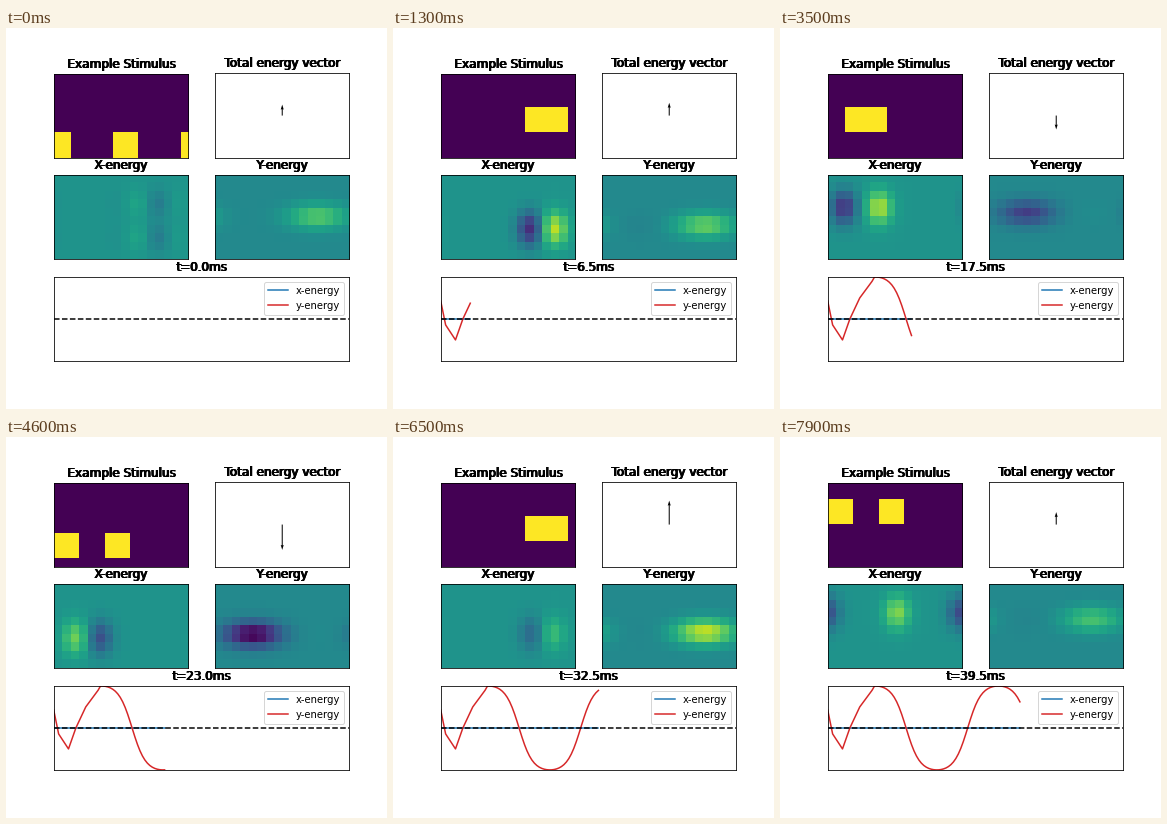
A matplotlib script for the animation above (8 s loop, 381 by 381 pixels).

```python
import numpy as np
import matplotlib.pyplot as plt
from matplotlib.animation import FuncAnimation

DPI, FRAMES, PERIOD = 72, 80, 50
COLS, ROWS = 16, 10
HALF_W, HALF_H = 67.2, 42.4
LAG = 4.5
SCALE = 5.3 * DPI / 381  # layout is a fraction of a pixel larger than the stage

row, col = np.mgrid[:ROWS, :COLS]
steps = np.arange(FRAMES)


def phase(i):
    return 2 * np.pi * i / PERIOD


def y_curve(i):
    """Start-up dip, then a slightly squared cosine."""
    start = np.interp(i, [0, 2, 6, 9, 13, 19], [18, -6, -21, 0, 21, 41])
    steady = 42 * np.tanh(1.3 * np.cos(phase(i - 19.3))) / np.tanh(1.3)
    return np.where(i < 19, start, steady)


y_energy = y_curve(steps)
x_energy = np.zeros(FRAMES)


def lobe(c, r, sc, sr):
    """Gaussian blob that wraps around horizontally."""
    dx = (col - c + COLS / 2) % COLS - COLS / 2
    return np.exp(-dx ** 2 / (2 * sc ** 2) - (row - r) ** 2 / (2 * sr ** 2))


def stimulus(i):
    img = np.zeros((ROWS, COLS))
    top = 4 + int(3 * np.cos(phase(i)))
    shift = int(4 * np.sin(phase(i)))
    for center in (8 + shift, -shift):
        for k in (-1, 0, 1):
            img[top:top + 3, (center + k) % COLS] = 1
    return img


def x_field(i):
    s, c = np.sin(phase(i - LAG)), np.cos(phase(i - LAG))
    amp = -0.3 * np.tanh(3 * c) * (1 - np.exp(-i / 3))
    amp *= 1 + 0.5 / (1 + np.exp((i - 35) / 4))
    r = 5 + 2 * c
    pair = lobe(7.5 + 3 * s, r, 1.1, 1.4) - lobe(-0.5 - 3 * s, r, 1.1, 1.4)
    ripple = 0.1 * np.exp(-i / 2) * np.cos(phase((col - 9) * 8.5))
    ripple = ripple * (lobe(11, 3, 2.2, 1.2) + lobe(11, 7, 2.2, 1.2))
    return 0.515 + amp * pair + ripple


def y_field(i):
    v = y_energy[i]
    soft = np.hypot(v, 12)
    up, down = (soft + v) / 2, (soft - v) / 2
    gain = 0.0108 * (1 + 0.4 * np.exp(-i / 25))
    r = 5 + 1.2 * np.cos(phase(i - LAG)) - 1.5 * np.exp(-i / 2)
    low_col = 12 if i < PERIOD / 4 else 4
    field = up * lobe(11.7, r, 2.5, 1.05) - down * lobe(low_col, r, 2.4, 1.05)
    return 0.47 + gain * field


def heading(ax, text):
    """Heavy title made of stacked copies, half of them one pixel right."""
    return [ax.annotate(text, (0.5, 1), xycoords="axes fraction",
                        xytext=(dx, 6), textcoords="offset points",
                        ha="center", va="baseline", fontsize=12)
            for dx in (0, 1) for _ in range(2)]


plt.rcParams["font.family"] = "DejaVu Sans"
fig = plt.figure(figsize=(5.2917, 5.2917), dpi=DPI, facecolor="white")
grid = fig.add_gridspec(3, 2, left=0.125 * SCALE, right=0.9 * SCALE,
                        bottom=0.125 * SCALE, top=0.88 * SCALE,
                        wspace=0.2, hspace=0.2)
ax_stim, ax_vec, ax_x, ax_y = (fig.add_subplot(grid[k // 2, k % 2])
                               for k in range(4))
ax_line = fig.add_subplot(grid[2, :])
for ax in fig.axes:
    ax.set_xticks([])
    ax.set_yticks([])

heading(ax_stim, "Example Stimulus")
heading(ax_vec, "Total energy vector")
heading(ax_x, "X-energy")
heading(ax_y, "Y-energy")
clock = heading(ax_line, "t=0.0ms")

panels = [(ax.imshow(field(0), cmap="viridis", vmin=0, vmax=1,
                     interpolation="nearest"), field)
          for ax, field in ((ax_stim, stimulus), (ax_x, x_field),
                            (ax_y, y_field))]

ax_vec.set(xlim=(-HALF_W, HALF_W), ylim=(-HALF_H, HALF_H))
arrow = ax_vec.quiver([0], [0], [0], [10], angles="xy", scale_units="xy",
                      scale=1, color="black")

x_line, = ax_line.plot([], [], color="tab:blue", label="x-energy")
y_line, = ax_line.plot([], [], color="tab:red", label="y-energy")
ax_line.axhline(0, color="black", linestyle="--")
ax_line.set(xlim=(0, 120), ylim=(-HALF_H, HALF_H))
ax_line.legend(loc="upper right")


def update(i):
    for image, field in panels:
        image.set_data(field(i))
    arrow.set_UVC([0], [0.61 * y_energy[i]])
    x_line.set_data(steps[:i], x_energy[:i])
    y_line.set_data(steps[:i], y_energy[:i])
    for text in clock:
        text.set_text(f"t={i / 2:.1f}ms")
    return []


anim = FuncAnimation(fig, update, frames=FRAMES, interval=100,
                     repeat=True, repeat_delay=0, blit=False)
plt.show()
```
